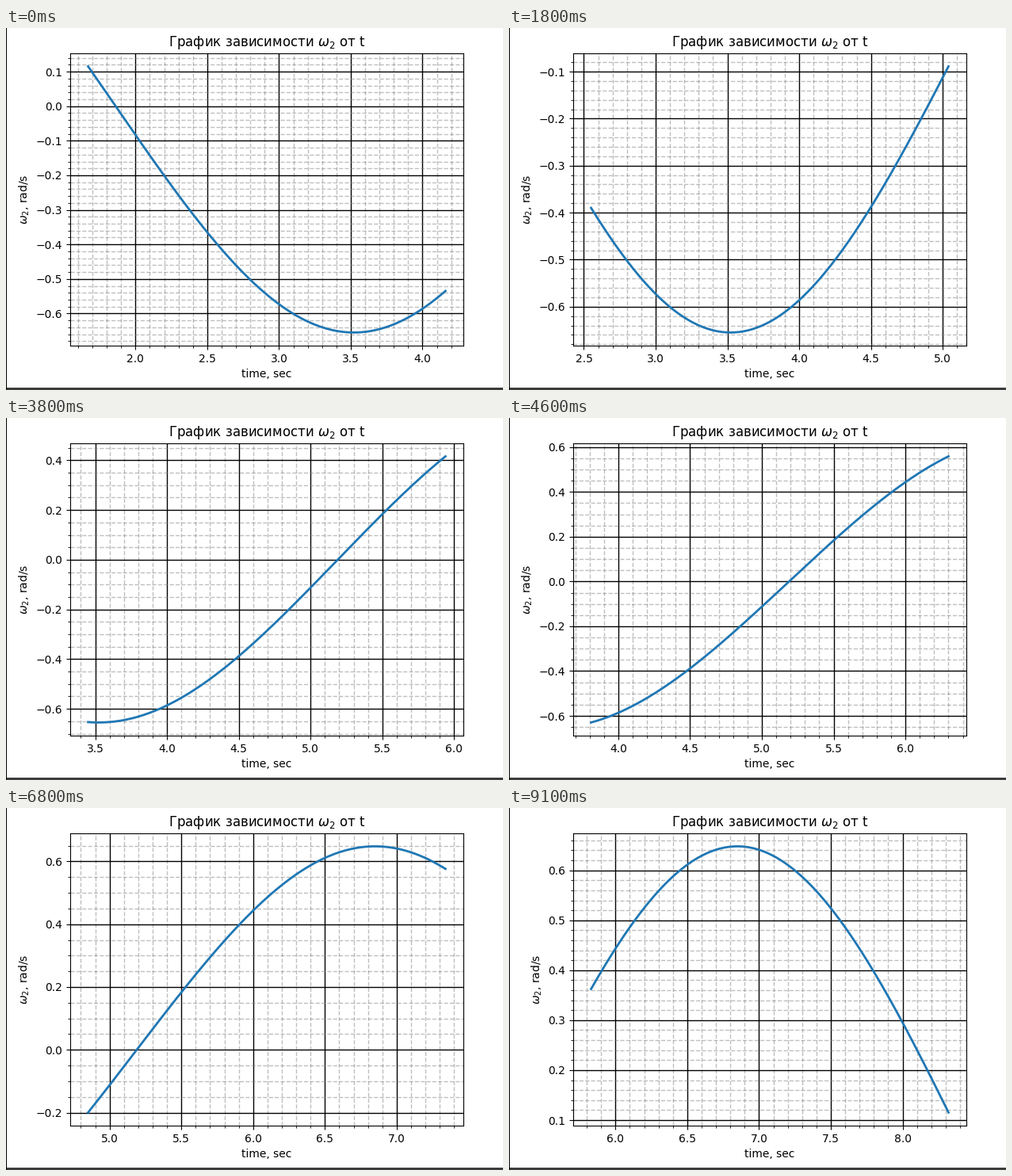
Recreate the animation shown at these times as a matplotlib script. Size 627x457 px, loop 9.2 s.

```python
import numpy as np
import matplotlib.pyplot as plt
from matplotlib.animation import FuncAnimation
from matplotlib.patches import Rectangle

W, H, DPI = 627, 457, 100
FRAMES, INTERVAL = 92, 100
DT, POINTS, T0 = 0.01, 250, 1.67

# Uneven playback speed with one short stall: (frame, steps advanced)
PACE = np.array([(0, 0), (18, 44), (38, 89), (53, 123), (68, 159),
                 (70, 164), (71, 164), (77, 178), (91, 208)])


def omega(t):
    """Angular velocity of a slightly damped pendulum."""
    s = t - 5.189
    phase = 0.9443 * s
    amp = 0.6515 * np.exp(-0.0032 * s)
    e = 0.0075
    return amp * (np.sin(phase) - e * np.sin(3 * phase)) / (1 + e)


def window(frame):
    steps = np.round(np.interp(frame, PACE[:, 0], PACE[:, 1]))
    return T0 + 2 * DT * steps + DT * np.arange(POINTS)


def strip(x, y, w, h, color):
    fig.add_artist(Rectangle((x / W, y / H), w / W, h / H, color=color,
                             lw=0, antialiased=False,
                             transform=fig.transFigure))


plt.rcParams["font.family"] = "DejaVu Sans"
fig = plt.figure(figsize=(W / DPI, H / DPI), dpi=DPI, facecolor="white")
ax = fig.add_axes([81 / W, 55.8 / H, 496 / W, 369.6 / H])

ax.set_title(r"График зависимости $\omega_2$ от t")
ax.set_xlabel("time, sec")
ax.set_ylabel(r"$\omega_2$, rad/s")
ax.minorticks_on()
ax.grid(which="major", color="k", linewidth=1)
ax.grid(which="minor", color="gray", linestyle="--", linewidth=1, alpha=0.5)
line, = ax.plot([], [], color="tab:blue", lw=2)

# Window border
strip(0, 0, W, 3, "#3c3c3c")
strip(0, 0, 1, H, "black")


def update(frame):
    t = window(frame)
    line.set_data(t, omega(t))
    ax.relim()
    ax.autoscale_view()
    return line,


anim = FuncAnimation(fig, update, frames=FRAMES, interval=INTERVAL,
                     init_func=lambda: update(0), repeat=True,
                     repeat_delay=0, blit=False)
plt.show()
```
